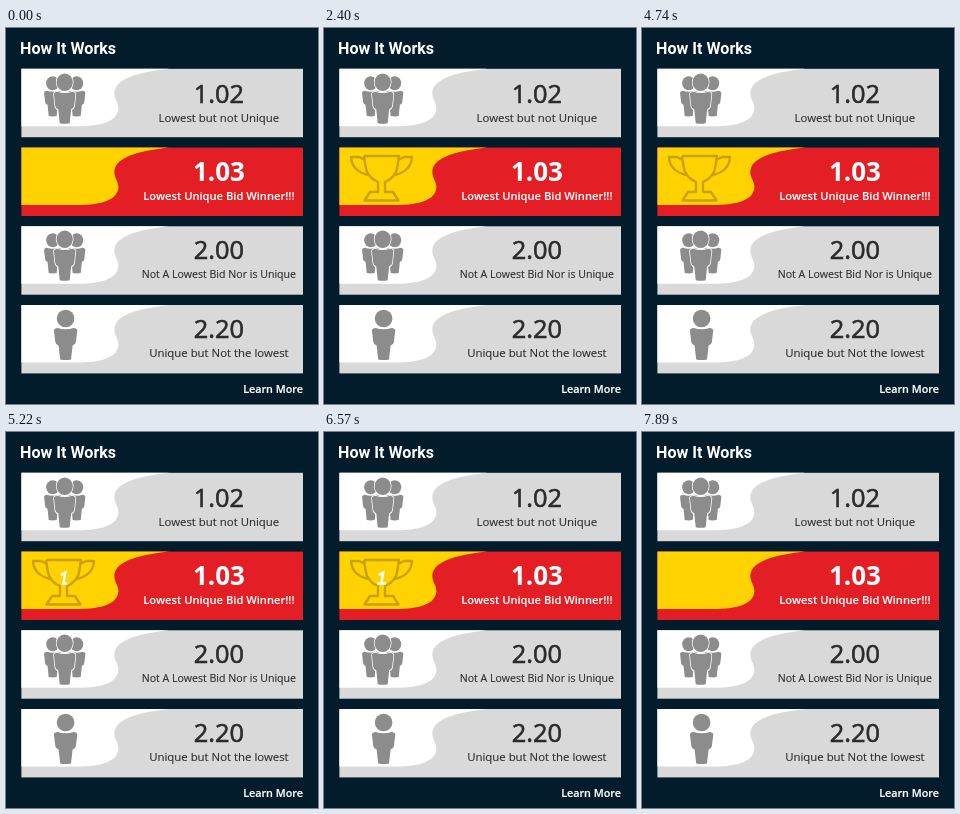
An HTML page for the animation above (8070 ms loop, 312 by 376 pixels).

```html
<!DOCTYPE html>
<html lang="en">
<head>
<meta charset="utf-8">
<title>How It Works</title>
<style>
  html, body { margin: 0; width: 100%; height: 100%; overflow: hidden; background: #021c2c; }
  svg { display: block; width: 312px; height: 376px; }
  text { font-family: "Open Sans", "Noto Sans", sans-serif; fill: #2b2b2b; }
  .price, .note { text-anchor: middle; }
  .price { font-size: 25.4px; stroke: #2b2b2b; stroke-width: .6; }
  .note { font-size: 11.4px; stroke: #2b2b2b; stroke-width: .12; }
  .small { font-size: 10.6px; }
  .win text { fill: #fff; stroke: none; }
  .win .price { font-size: 26px; font-weight: 700; }
  .win .note { font-size: 11.15px; font-weight: 600; stroke: #fff; }
  .title, .more { fill: #fff; }
  .title { font: 700 16.1px Roboto, sans-serif; }
  .more { font-size: 10.8px; font-weight: 600; text-anchor: end; stroke: #fff; stroke-width: .2; }
  .person { fill: #8c8c8c; }
  .front { stroke: #fff; stroke-width: 1.6; paint-order: stroke; }

  .trophy { animation: show 8.07s step-end infinite; }
  .trophy path {
    fill: none; stroke: #c9a10a; stroke-width: 2.4; stroke-linejoin: round;
    stroke-dasharray: 100 102; stroke-dashoffset: 101;
    animation: 8.07s linear infinite;
  }
  .trophy .cup { animation-name: cup; }
  .trophy .handle { animation-name: handle; }
  .trophy .one { stroke: #fff; stroke-linejoin: miter; animation-name: one; }

  @keyframes show { 0% { opacity: 1; } 97.39% { opacity: .5; } 97.76%, 100% { opacity: 0; } }
  @keyframes cup { 0% { stroke-dashoffset: 101; } 16.4%, 100% { stroke-dashoffset: 0; } }
  @keyframes handle { 0%, 16.4% { stroke-dashoffset: 101; } 22.7%, 100% { stroke-dashoffset: 0; } }
  @keyframes one { 0%, 58.7% { stroke-dashoffset: 101; } 67.5%, 100% { stroke-dashoffset: 0; } }
</style>
</head>
<body>
<svg viewBox="0 0 312 376">
  <defs>
    <path id="wave" d="M0 0H148C110 4 92 12 93 26C94 32 97 34 97 40C96 52 82 57.5 55 57.5H0Z"/>
    <rect id="card" width="281.6" height="68.4"/>
    <g id="person">
      <circle cy="-12" r="8.8"/>
      <path d="M-11.7 0Q-11.7 -2 -8 -2.5Q0 0 8 -2.5Q11.7 -2 11.7 0L10.3 11.5Q9.8 14.5 7 15L5.4 29Q0 30 -5.4 29L-7 15Q-9.8 14.5 -10.3 11.5Z"/>
    </g>
    <g id="group" class="person">
      <use href="#person" transform="translate(-12 -1.5) scale(.74 .8)"/>
      <use href="#person" transform="translate(12 -1.5) scale(.74 .8)"/>
      <use href="#person" class="front" transform="scale(.92 1)"/>
    </g>
    <path id="handle" pathLength="100" d="M41 132L35 129H27C27.5 138 32 144 44 147"/>
  </defs>

  <rect width="312" height="376" fill="#021c2c"/>
  <text class="title" x="14" y="26.2">How It Works</text>

  <g transform="translate(15.4 40.8)">
    <use href="#card" fill="#d9d9d9"/>
    <use href="#wave" fill="#fff"/>
    <use href="#group" x="43.3" y="25.5"/>
    <text class="price" x="197.5" y="34.3">1.02</text>
    <text class="note" x="197.5" y="53.2">Lowest but not Unique</text>
  </g>

  <g class="win" transform="translate(15.4 119.6)">
    <use href="#card" fill="#e31e24"/>
    <use href="#wave" fill="#ffd200"/>
    <g class="trophy" transform="translate(-15.4 -119.6)">
      <path class="cup" pathLength="100" d="M40 128H75L73.5 138C72.5 147 68 151 61 154V164H69L74.5 172.5H40.5L46 164H54V154C47 151 42.5 147 41.5 138L40 128"/>
      <path class="handle" pathLength="100" d="M41 132L35 129H27C27.5 138 32 144 44 147"/>
      <path class="handle" pathLength="100" d="M74 132L80 129H88C87.5 138 83 144 71 147"/>
      <path class="one" pathLength="100" d="M54.8 143L59.3 140.5L57.3 151.5H62H53"/>
    </g>
    <text class="price" x="197.5" y="33.4">1.03</text>
    <text class="note" x="197.5" y="52.2">Lowest Unique Bid Winner!!!</text>
  </g>

  <g transform="translate(15.4 198.3)">
    <use href="#card" fill="#d9d9d9"/>
    <use href="#wave" fill="#fff"/>
    <use href="#group" x="43.3" y="25"/>
    <text class="price" x="197.5" y="33.2">2.00</text>
    <text class="note small" x="197.5" y="51.8">Not A Lowest Bid Nor is Unique</text>
  </g>

  <g transform="translate(15.4 277)">
    <use href="#card" fill="#d9d9d9"/>
    <use href="#wave" fill="#fff"/>
    <use href="#person" class="person" x="44.2" y="25.5"/>
    <text class="price" x="197.5" y="33.2">2.20</text>
    <text class="note" x="197.5" y="51.7">Unique but Not the lowest</text>
  </g>

  <text class="more" x="297" y="364.5">Learn More</text>
</svg>
</body>
</html>
```
